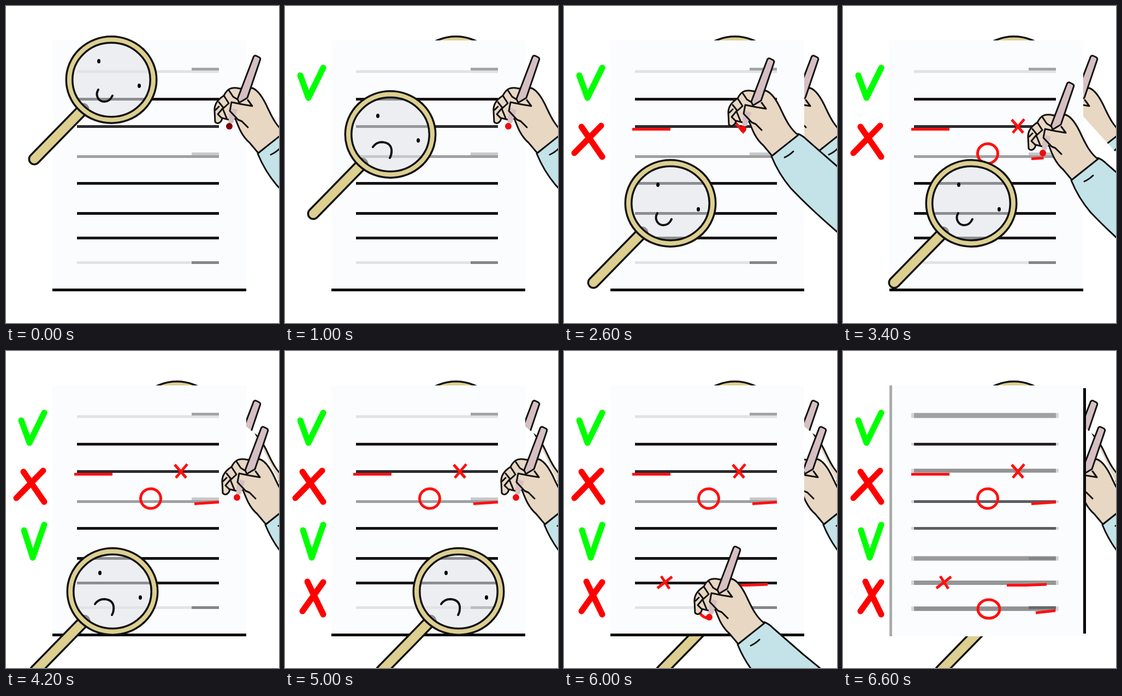
Animation of 500 by 580 pixels, one loop 7000 ms. Source, as an HTML page:

```html
<!DOCTYPE html>
<html lang="en">
<head>
<meta charset="utf-8">
<title>Proofreading</title>
<style>
html, body { margin: 0; width: 100%; height: 100%; overflow: hidden; background: #fff; }
svg { display: block; width: 500px; height: 580px; }
.ink { fill: none; stroke: #111; stroke-width: 3; stroke-linecap: round; stroke-linejoin: round; }
.shape { stroke: #111; stroke-width: 3; stroke-linejoin: round; }
.big { fill: none; stroke-width: 11; stroke-linecap: round; stroke-linejoin: round; }
.pen { fill: none; stroke: #ff1010; stroke-width: 5; }
</style>
</head>
<body>
<svg viewBox="0 0 500 580" xmlns="http://www.w3.org/2000/svg">
  <defs>
    <g id="glass">
      <path d="M-52 54L-141 145" fill="none" stroke="#111" stroke-width="23" stroke-linecap="round"/>
      <path d="M-52 54L-141 145" fill="none" stroke="#dccf90" stroke-width="16" stroke-linecap="round"/>
      <ellipse rx="71" ry="68" fill="#e2e6e8" fill-opacity=".58"/>
      <ellipse rx="77" ry="73.5" fill="none" stroke="#111" stroke-width="15"/>
      <ellipse rx="77" ry="73.5" fill="none" stroke="#dccf90" stroke-width="8"/>
    </g>
    <g id="hand">
      <path class="shape" fill="#c3e3e8" d="M461 270Q474 302 496 328Q530 364 581 408L780 576L840 500L581 288L526 240Q518 232 510 229Z"/>
      <path class="ink" d="M485 272Q494 268 501 261"/>
      <path class="shape" fill="#e8d7c3" d="M428 151C412 147 405 152 399 164C388 171 381 180 382 192L383 212C388 218 395 212 396 205L408 208L420 206C426 222 432 238 446 250L462 269L510 231C497 222 488 205 480 188C472 170 462 154 451 150Z"/>
      <path class="shape" fill="#d5bfc2" d="M453 94Q454 90 458 91L464 94Q467 96 465 100L442 168L427 177L424 170Z"/>
      <path fill="#d5bfc2" d="M410 186L424 190L416 214L407 217Z"/>
      <path class="ink" d="M413 176L433 180L451 183M443 172L451 183M399 164L408 178L397 188L404 205M390 176L398 186L388 198L396 206M408 154L416 166L424 171M413 176L410 192L425 208L432 211L443 222M384 190L390 184"/>
    </g>
    <clipPath id="side1"><path id="side1Path"/></clipPath>
    <clipPath id="side2"><path d="M440 0H500V580H440Z"/></clipPath>
    <clipPath id="above"><path d="M0 0H500V63H0Z"/></clipPath>
    <clipPath id="below"><path d="M0 521H500V580H0Z"/></clipPath>
  </defs>

  <g id="cap" clip-path="url(#above)"><use href="#glass" x="313" y="135"/></g>
  <g id="stub" clip-path="url(#below)"><use href="#glass" x="320" y="440"/></g>
  <g id="trace1" clip-path="url(#side1)"><use href="#hand"/></g>
  <g id="trace2" clip-path="url(#side2)"><use href="#hand" x="14" y="48"/></g>

  <path fill="#fbfcfe" d="M85 63H440V522H85Z"/>
  <g id="draft"></g>
  <g id="final"></g>
  <g id="marks"></g>
  <g id="lens">
    <use href="#glass"/>
    <ellipse cx="-23" cy="-34" rx="3" ry="4"/>
    <ellipse cx="51" cy="11" rx="3" ry="4"/>
    <path id="mouth" class="ink" style="stroke-width:4"/>
  </g>
  <g id="writer">
    <use href="#hand"/>
    <circle id="nib" cx="409" cy="220" r="6"/>
  </g>
</svg>
<script>
const STEP = 200, LAST = 33, LOOP = 7000;
const $ = id => document.getElementById(id);

function add(parent, tag, attrs) {
  const el = document.createElementNS('http://www.w3.org/2000/svg', tag);
  for (const k in attrs) el.setAttribute(k, attrs[k]);
  return $(parent).appendChild(el);
}

const bar = (group, x1, x2, y, h, fill) =>
  add(group, 'rect', { x: x1, y: y - h / 2, width: x2 - x1, height: h, fill });

// Text lines while the page is being checked
[[120, '#e1e2e3'], [170.5, '#171216'], [220.5, '#2b2b2f'], [275.5, '#9fa0a2'],
 [324.5, '#151215'], [379.5, '#151215'], [424.5, '#191619'], [469.5, '#e2e3e5']]
  .forEach(([y, c]) => bar('draft', 130, 390, y, 5, c));
bar('draft', 340, 390, 115.5, 5, '#a3a4a5');
bar('draft', 340, 390, 270.5, 5, '#c8c9cb');
bar('draft', 340, 390, 469.5, 5, '#868688');
bar('draft', 85, 440, 519.5, 5, '#000');

// The finished page
[[118, 9, '#a0a1a3'], [170.5, 5, '#251f23'], [219, 7, '#939395'], [275.5, 5, '#5b5c60'],
 [324.5, 5, '#5f5f63'], [379.5, 8, '#9a9a9c'], [424, 8, '#969698'], [471.5, 8, '#909092']]
  .forEach(([y, h, c]) => {
    bar('final', 125, 395, y, h, '#d4d5d7');
    bar('final', 130, 390, y, h, c);
  });
bar('final', 340, 390, 379.5, 5, '#858587');
bar('final', 340, 390, 469.5, 5, '#68686a');
bar('final', 85, 90, 292.5, 459, '#aaabad');
bar('final', 440, 445, 292.5, 449, '#000');

// Each mark: style, path, first step, steps needed to draw it
const GREEN = '#00ff00', RED = '#ff0000';
const ring = (x, y, rx, ry) =>
  `M${x} ${y - ry}A${rx} ${ry} 0 0 0 ${x} ${y + ry}A${rx} ${ry} 0 0 0 ${x} ${y - ry}`;
const marks = [
  [GREEN, 'M28 127L43 168L70 113', 3, 2],
  [RED, 'M32 221L70 276M19 269L68 219', 8, 2],
  [GREEN, 'M33 328L49 378L70 318', 19, 2],
  [RED, 'M41 422L70 482M32 476L70 423', 24, 2],
  ['', 'M125 225.5H195', 10, 3],
  ['', 'M309 208L330 232M332 207L311 232', 13, 2],
  ['', ring(265, 270, 18.5, 18), 15, 2],
  ['', 'M345 279.5L390 276.5', 17, 2],
  ['', 'M178 412L193 435M198 413L171 434', 26, 2],
  ['', 'M300 428.5H335L373 427', 28, 2],
  ['', ring(267, 472, 20, 17), 30, 2],
  ['', 'M353 479L389 475', 32, 1]
].map(([color, d, start, steps]) => {
  const el = add('marks', 'path', { d, pathLength: 1, class: color ? 'big' : 'pen' });
  if (color) el.setAttribute('stroke', color);
  const crossed = d.lastIndexOf('M') > 0;
  return { el, d, start, steps, crossed };
});

const tips = {
  10: [135, 225], 11: [165, 225], 12: [195, 225], 13: [327, 227], 14: [313, 232],
  15: [260, 270], 16: [267, 254], 17: [365, 271], 18: [390, 276],
  26: [192, 434], 27: [173, 433], 28: [327, 427], 29: [372, 427],
  30: [265, 489], 31: [268, 456], 32: [388, 475]
};
const REST = [422, 270], START = [408, 222];
const tipAt = i => tips[i] || (i < 10 ? START : REST);

const clamp = (v, lo, hi) => Math.min(hi, Math.max(lo, v));

// First step of each row, when the sweep begins, place, stride and mood
const rows = [
  { from: 0, go: 0, x: 193, y: 135, dx: 40, sad: false },
  { from: 5, go: 5, x: 193, y: 235, dx: 37, sad: true },
  { from: 10, go: 16, x: 195, y: 361, dx: 40, sad: false },
  { from: 21, go: 21, x: 195, y: 440, dx: 41, sad: true }
];
const SMILE = 'M-24 18C-31 30 -22 40 -13 40Q-3 40 2 29';
const FROWN = 'M-32 23Q-26 14 -15 14Q0 15 2 27Q3 36 -1 43';

const show = (el, on) => { el.style.display = on ? '' : 'none'; };

function traceShape(i) {
  if (i < 14) return 'M440 0H500V580H440Z';
  if (i < 19) return 'M440 85H500V268L440 202Z';
  return 'M440 85H500V240L470 178L455 150L440 138Z';
}

function draw(i) {
  show($('cap'), i > 4);
  show($('stub'), i > 25);
  show($('trace1'), i > 9);
  show($('trace2'), i > 25);
  show($('draft'), i < LAST);
  show($('final'), i === LAST);
  $('side1Path').setAttribute('d', traceShape(i));

  for (const m of marks) {
    const p = clamp((i - m.start + 1) / m.steps, 0, 1);
    show(m.el, p > 0);
    if (m.crossed) {
      m.el.setAttribute('d', p < 1 ? m.d.slice(0, m.d.lastIndexOf('M')) : m.d);
    } else {
      m.el.setAttribute('stroke-dasharray', p < 1 ? `${p} 2` : 'none');
    }
  }

  const row = rows.filter(r => r.from <= i).pop();
  const x = row.x + row.dx * clamp(i - row.go, 0, 3);
  show($('lens'), i < 26);
  $('lens').setAttribute('transform', `translate(${x} ${row.y})`);
  $('mouth').setAttribute('d', row.sad ? FROWN : SMILE);

  const [tx, ty] = tipAt(i);
  show($('writer'), i < LAST);
  $('writer').setAttribute('transform', `translate(${tx - START[0]} ${ty - START[1]})`);
  $('nib').setAttribute('fill', i ? '#f00a0a' : '#800000');
}

const t0 = performance.now();
function tick() {
  const t = (performance.now() - t0) % LOOP;
  draw(Math.min(LAST, Math.floor(t / STEP)));
  requestAnimationFrame(tick);
}
tick();
</script>
</body>
</html>
```
